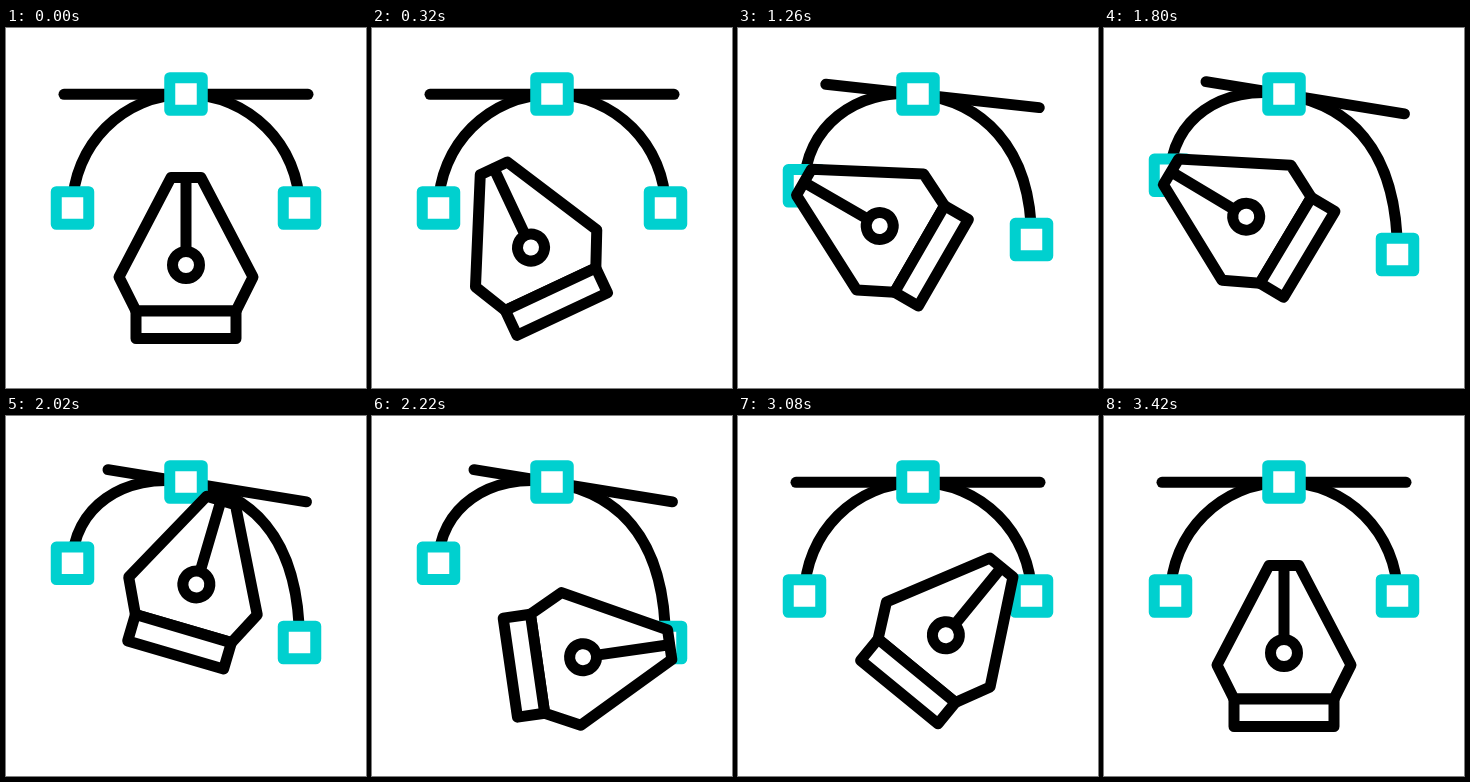
Write an HTML page that moves like this. It is 360 px wide and 360 px high and loops after 3600 ms.

```html
<!DOCTYPE html>
<html lang="en">
<head>
<meta charset="utf-8">
<title>Pen tool</title>
<style>
  html, body { margin: 0; width: 100%; height: 100%; overflow: hidden; background: #fff; }
  svg { display: block; width: 100vw; height: 100vh; }
  .ink { stroke: #000; stroke-width: 11; stroke-linecap: round; stroke-linejoin: round; }
  .node { fill: #fff; stroke: #00d0cf; stroke-width: 11; stroke-linejoin: round; }
</style>
</head>
<body>
<svg viewBox="0 0 360 360">
  <g class="ink" fill="none">
    <path id="curve"/>
    <path id="bar"/>
  </g>
  <rect class="node" x="163.75" y="49.75" width="32.5" height="32.5"/>
  <rect class="node" id="left" x="50.25" width="32.5" height="32.5"/>
  <rect class="node" id="right" x="277.25" width="32.5" height="32.5"/>
  <g class="ink" id="pen" fill="#fff">
    <path d="M165 149.5H195L247 249L230 283H130L113 249Z"/>
    <path d="M130 283H230V310.5H130Z"/>
    <path d="M180 150V223"/>
    <circle cx="180" cy="237" r="13.5"/>
  </g>
</svg>
<script>
const LOOP = 3600;
const [curve, bar, left, right, pen] =
  ['curve', 'bar', 'left', 'right', 'pen'].map(id => document.getElementById(id));

// Pen poses: position of its base and its turn in degrees
const home = { x: 180, y: 312, turn: 0 };
const grabLeft = { x: 206, y: 253.5, turn: -60 };
const dropLeft = { x: 207, y: 227, turn: -60 };
const grabRight = { x: 136.5, y: 252, turn: 82.5 };
const dropRight = { x: 150, y: 259, turn: 60 };

const mix = (a, b, k) => a + (b - a) * k;

// Eased progress from 0 to 1 between two times
function ramp(t, from, to) {
  const u = Math.min(1, Math.max(0, (t - from) / (to - from)));
  return u * u * (3 - 2 * u);
}

function drawCurve(bend) {
  const tilt = 9.2 * Math.PI / 180 * bend;
  const along = d => `${180 + d * Math.cos(tilt)} ${66.3 + d * Math.sin(tilt)}`;
  const reach = 62.7; // control length of a quarter circle
  const ly = mix(180, 147.3, bend), ry = mix(180, 226.5, bend);

  left.setAttribute('y', ly - 16.25);
  right.setAttribute('y', ry - 16.25);
  bar.setAttribute('d', `M${along(mix(-122, -79, bend))}L${along(122)}`);
  curve.setAttribute('d',
    `M66.5 ${ly}C66.5 ${mix(117.3, 92, bend)} ${along(-reach)} ${along(0)}` +
    `C${along(reach)} 293.5 117.3 293.5 ${ry}`);
}

function drawPen(t, pullLeft, pullRight) {
  const pose = { ...home };
  const move = (to, k) => {
    for (const p in pose) pose[p] = mix(pose[p], to[p], k);
  };
  move(grabLeft, ramp(t, 0, 720));
  move(dropLeft, pullLeft);
  move(grabRight, ramp(t, 1780, 2240));
  move(dropRight, pullRight);
  move(home, ramp(t, 2860, 3420));
  pen.setAttribute('transform',
    `translate(${pose.x} ${pose.y}) rotate(${pose.turn}) translate(${-home.x} ${-home.y})`);
}

function draw(t) {
  const pullLeft = ramp(t, 900, 1480);
  const pullRight = ramp(t, 2240, 2660);
  drawCurve(pullLeft - pullRight);
  drawPen(t, pullLeft, pullRight);
}

const start = performance.now();
function tick() {
  draw(Math.max(0, performance.now() - start) % LOOP);
  requestAnimationFrame(tick);
}
draw(0);
requestAnimationFrame(tick);
</script>
</body>
</html>
```
